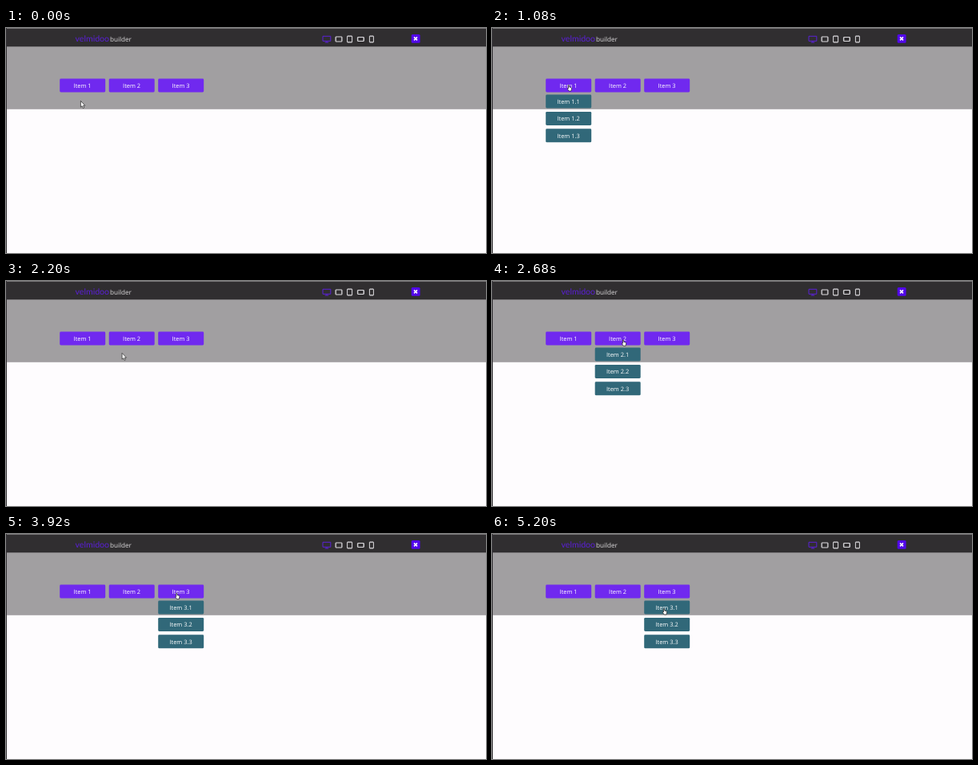
An HTML page that plays this animation: 600 px wide and 282 px high, repeating every 5.36 s.

```html
<!DOCTYPE html>
<html lang="en">
<head>
<meta charset="utf-8">
<title>Menu builder</title>
<style>
  html, body { margin: 0; width: 100%; height: 100%; overflow: hidden; background: #fefcfe; }
  svg { display: block; width: 600px; height: 282px; }
  text { font-family: "Open Sans", "Noto Sans", sans-serif; text-rendering: geometricPrecision; }
  .label { font-size: 7.45px; fill: #fff; text-anchor: middle; }
  .brand { font: 400 10.6px Lato, sans-serif; fill: #5a1fd6; }
</style>
</head>
<body>
<svg viewBox="0 0 600 282" xmlns="http://www.w3.org/2000/svg">
  <rect width="600" height="282" fill="#fefcfe"/>
  <rect y="23" width="600" height="78.8" fill="#a19fa1"/>
  <rect width="600" height="23.3" fill="#302e30"/>
  <rect width="600" height="1" fill="#767476"/>
  <rect width="1" height="282" fill="#343236"/>

  <text class="brand" x="86.5" y="17">velmidoo</text>
  <text x="130" y="16.8" font-size="8.15" fill="#dcdadc">builder</text>

  <path d="M396 10.3H405.8V16.3H396ZM400.9 16.5V18M398.7 18H403.2" fill="none" stroke="#5b21d6"/>
  <g id="devices" fill="none" stroke="#dedce0"></g>

  <rect x="506.7" y="8" width="10.9" height="10.8" rx="1.5" fill="#5208ea"/>
  <path d="M510 11.4L514 15.4M514 11.4L510 15.4" stroke="#fff" stroke-width="1.5"/>

  <g id="buttons"></g>
  <g id="pointer" stroke="#222" stroke-width="0.7" stroke-linejoin="round" fill="#fff">
    <path id="arrow" d="M0.4 0.4V8.2L2.1 6.7L3.3 9.5L4.7 8.9L3.5 6.2H5.8Z"/>
    <path id="hand" d="M1.4 0.6Q2 0 2.5 0.8L2.8 3.1L4.8 3.6Q5.8 3.9 5.6 4.9L5 8H2.2L0.4 5.3Q0.3 4.5 1 4.5L1.5 5Z"/>
  </g>
</svg>
<script>
const LOOP = 5360, STEP = 40;
const byId = id => document.getElementById(id);

function add(parent, tag, attrs, text = "") {
  const el = document.createElementNS("http://www.w3.org/2000/svg", tag);
  for (const key in attrs) el.setAttribute(key, attrs[key]);
  el.textContent = text;
  return parent.appendChild(el);
}

// Outline centred on cx, with thicker bezels on its short sides.
function addDevice(cx, width, height) {
  const x = cx - width / 2, y = 14 - height / 2;
  const wide = width > height;
  add(byId("devices"), "rect", { x, y, width, height, rx: 0.4 });
  add(byId("devices"), "path", {
    d: wide ? `M${x + 0.6} ${y}v${height}m${width - 1.2} 0v${-height}`
            : `M${x} ${y + 0.6}h${width}m0 ${height - 1.2}h${-width}`,
    "stroke-width": 0.6
  });
}

addDevice(416, 8, 6);
addDevice(429.6, 6, 8);
addDevice(443.4, 8, 5);
addDevice(456.9, 5, 8);

function addButton(parent, x, y, fill, text) {
  add(parent, "rect", { x, y, width: 57, height: 17, rx: 1.4, fill });
  add(parent, "text", { x: x + 28.4, y: y + 11.2, class: "label" }, text);
}

const submenus = [1, 2, 3].map(n => {
  const x = 67.2 + (n - 1) * 61.5;
  addButton(byId("buttons"), x, 63.5, "#7029ef", `Item ${n}`);
  const group = add(byId("buttons"), "g", {});
  for (let k = 1; k <= 3; k++)
    addButton(group, x, 62.1 + k * 21.4, "#316879", `Item ${n}.${k}`);
  return group;
});

const openSpans = [[800, 1760], [2480, 2880], [3720, LOOP]];

// Turning points of the pointer; it eases from each one to the next.
const stops = [
  { t: 520, x: 93, y: 91 },
  { t: 1080, x: 94, y: 71 },
  { t: 1720, x: 122, y: 80 },
  { t: 2280, x: 146, y: 90.5 },
  { t: 2640, x: 159.5, y: 73 },
  { t: 2840, x: 184, y: 76 },
  { t: 3400, x: 198, y: 94 },
  { t: 4000, x: 212, y: 72.5 },
  { t: 4440, x: 212, y: 72.5 },
  { t: 5160, x: 213, y: 93 }
];

const ease = k => k * k * (3 - 2 * k);

function pointerAt(t) {
  const next = stops.findIndex(stop => stop.t > t);
  const b = stops.at(next), a = next > 0 ? stops[next - 1] : b;
  const k = a === b ? 0 : ease((t - a.t) / (b.t - a.t));
  return [a.x + (b.x - a.x) * k, a.y + (b.y - a.y) * k];
}

const show = (el, visible) => el.setAttribute("visibility", visible ? "visible" : "hidden");

function draw(t) {
  const open = openSpans.map(([from, to]) => t >= from && t < to);
  submenus.forEach((menu, i) => show(menu, open[i]));
  const overLink = open.includes(true);
  show(byId("hand"), overLink);
  show(byId("arrow"), !overLink);
  byId("pointer").setAttribute("transform", `translate(${pointerAt(t)})`);
}

const start = performance.now();
function tick() {
  const t = (performance.now() - start) % LOOP;
  draw(Math.floor(t / STEP) * STEP);
  requestAnimationFrame(tick);
}
tick();
</script>
</body>
</html>
```
